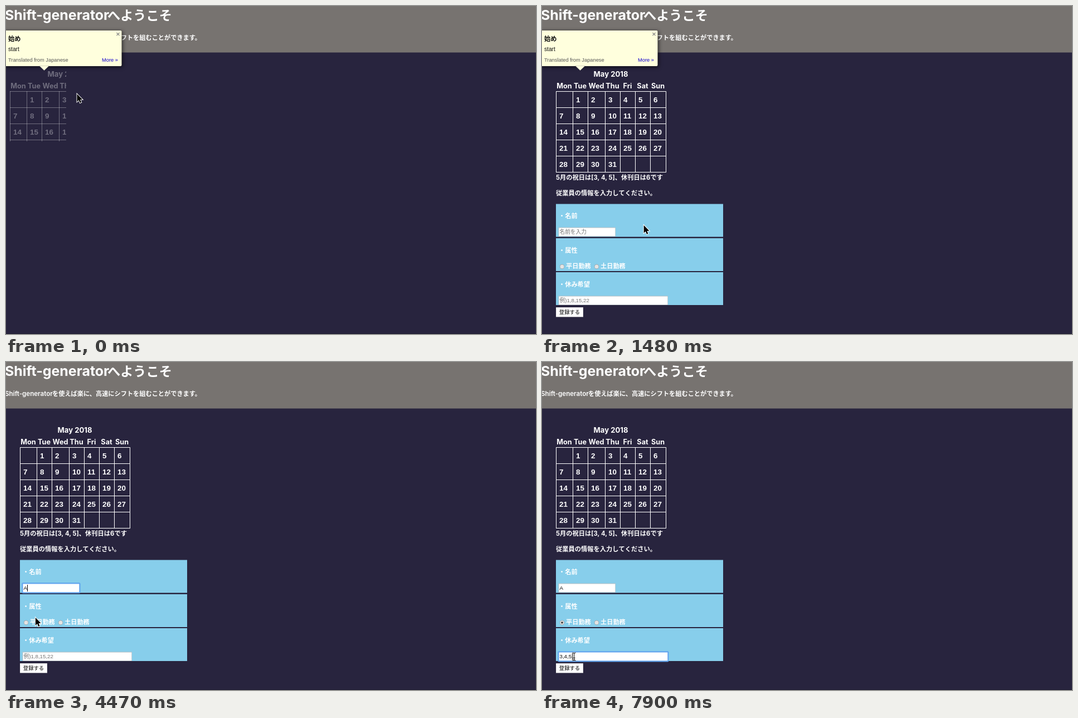
An HTML page with a canvas that plays this animation: 951 px wide and 589 px high, repeating every 8000 ms.

```html
<!DOCTYPE html>
<html lang="ja">
<head>
<meta charset="utf-8">
<title>Shift-generator</title>
<style>
html, body { margin: 0; width: 100%; height: 100%; overflow: hidden; background: #28243e; }
canvas { display: block; }
</style>
</head>
<body>
<canvas id="stage" width="951" height="589"></canvas>
<script>
const ctx = document.getElementById('stage').getContext('2d');
const LOOP = 8000;
const SKY = '#87ceeb';
const CJK = '"Noto Sans CJK JP", "Noto Sans CJK", sans-serif';
const HEADING = 'Inter, ' + CJK;
const FIELD = '"Liberation Sans", ' + CJK;

const NAME = { x: 30, y: 398, w: 102, h: 16 };
const DAYS_OFF = { x: 30, y: 521, w: 196, h: 16 };
const COLUMNS = [0, 30, 57, 88, 115, 142, 169, 197];
const ROWS = [153, 182, 211, 240, 269, 298];

// Pointer path: time, x, y
const PATH = [
  [0, 127, 157.5], [590, 183, 204], [1030, 234, 355], [1180, 235, 409],
  [1480, 183, 393], [1930, 114, 411], [3870, 114, 411], [4620, 35, 472],
  [4910, 35, 472], [5060, 40, 481], [5210, 52, 512], [5340, 57.5, 529]
];

function rect(x, y, w, h, color) {
  ctx.fillStyle = color;
  ctx.fillRect(x, y, w, h);
}

function text(str, x, y, font, color = '#fff', align = 'left') {
  ctx.font = font;
  ctx.fillStyle = color;
  ctx.textAlign = align;
  ctx.fillText(str, x, y);
}

function polygon(points, fill, stroke, width) {
  ctx.beginPath();
  points.forEach(([x, y]) => ctx.lineTo(x, y));
  ctx.closePath();
  ctx.strokeStyle = stroke;
  ctx.lineWidth = width;
  ctx.stroke();
  ctx.fillStyle = fill;
  ctx.fill();
}

function within(t, from, to) {
  return t >= from && t < to;
}

function header() {
  rect(0, 0, 951, 83.5, '#777370');
  text('Shift-generator', -2, 25, '700 24.9px ' + HEADING);
  text('へようこそ', 182, 25, '700 23.2px ' + CJK);
  text('Shift-generator', -2, 61, '600 11.6px ' + HEADING);
  text('を使えば楽に、高速にシフトを組むことができます。', 83, 61, '600 11.2px ' + CJK);
}

function tooltip() {
  ctx.save();
  ctx.shadowColor = 'rgba(0,0,0,.7)';
  ctx.shadowBlur = 7;
  ctx.shadowOffsetX = ctx.shadowOffsetY = 1.5;
  ctx.fillStyle = '#ffffdd';
  ctx.beginPath();
  ctx.roundRect(-4, 44, 211.5, 64, 2);
  ctx.fill();
  ctx.restore();
  polygon([[60, 107.5], [68.5, 115.5], [77, 107.5]], '#ffffdd', '#999', 0.8);
  text('始め', 4, 63, '700 11.2px ' + CJK, '#111');
  text('start', 4, 80.5, '10.2px ' + FIELD, '#111');
  text('Translated from Japanese', 4, 99.5, '9.3px ' + FIELD, '#555');
  text('More »', 172, 99.5, '9.3px ' + FIELD, '#1100cc');
  ctx.strokeStyle = '#888';
  ctx.lineWidth = 1.2;
  ctx.beginPath();
  ctx.moveTo(198.5, 48); ctx.lineTo(203.5, 53);
  ctx.moveTo(203.5, 48); ctx.lineTo(198.5, 53);
  ctx.stroke();
}

// Coordinates are relative to the left edge of the table.
function calendar() {
  text('May 2018', 98.5, 127, '700 13.1px ' + HEADING, '#fff', 'center');
  ['Mon', 'Tue', 'Wed', 'Thu', 'Fri', 'Sat', 'Sun'].forEach((day, i) => {
    const mid = (COLUMNS[i] + COLUMNS[i + 1]) / 2;
    text(day, mid, 147.5, '700 12.7px ' + HEADING, '#fff', 'center');
  });
  COLUMNS.forEach(x => rect(x, 153, 1, 146, '#fff'));
  ROWS.forEach(y => rect(0, y, 198, 1, '#fff'));
  for (let day = 1; day <= 31; day++) {
    text(day, COLUMNS[day % 7] + 6, ROWS[Math.floor(day / 7)] + 20, '700 13.4px ' + FIELD);
  }
  text('5月の祝日は[3, 4, 5]、休刊日は6です', 0, 312, '700 11.25px ' + HEADING);
  text('従業員の情報を入力してください。', 0, 340, '700 11.25px ' + CJK);
}

function input(box, value, hint, focused, caret) {
  const { x, y, w, h } = box;
  if (focused) {
    ctx.fillStyle = '#62a5ee';
    ctx.beginPath();
    ctx.roundRect(x - 1.7, y - 1.7, w + 3.2, h + 3.2, 2);
    ctx.fill();
  } else {
    rect(x - 0.5, y - 0.5, w + 0.5, h + 0.5, '#b5bfc4');
  }
  rect(x + 0.5, y + 0.5, w - 1.2, h - 1.2, '#fff');
  const font = '9.7px ' + FIELD;
  text(value || hint, 31.5, y + 11.3, font, value ? '#111' : '#757575');
  if (caret) rect(Math.round(32 + ctx.measureText(value).width), y + 2, 1, 12, '#000');
}

function radio(x, label, checked) {
  const dot = (r, color) => {
    ctx.fillStyle = color;
    ctx.beginPath();
    ctx.arc(x, 468, r, 0, Math.PI * 2);
    ctx.fill();
  };
  dot(4.2, '#929ca1');
  dot(3.5, '#e4e4e4');
  if (checked) dot(1.8, '#333');
  text(label, x + 7, 471, '600 11.2px ' + CJK);
}

function form(t, right) {
  [[355.5, '名前'], [417, '属性'], [478, '休み希望']].forEach(([y, label]) => {
    rect(25, y, right - 25, 59, SKY);
    text('・' + label, 30, y + 25.5, '600 11.2px ' + CJK);
  });

  const nameCaret = within(t, 2520, 2970) || within(t, 3420, 3870) || within(t, 4320, 4760);
  input(NAME, t >= 3420 ? 'A' : '', '名前を入力', within(t, 2520, 4760), nameCaret);

  radio(36, '平日勤務', t >= 4760);
  radio(98, '土日勤務', false);

  const typed = [7160, 7460, 7610, 7760, 7900].filter(at => t >= at).length;
  const daysCaret = within(t, 5660, 6110) || t >= 6710;
  input(DAYS_OFF, '3,4,5'.slice(0, typed), '例)1,8,15,22', t >= 5660, daysCaret);

  rect(25, 541, 49, 17.5, '#c8c8c8');
  rect(25.5, 541.5, 48, 16.5, '#fff');
  text('登録する', 49.5, 552.5, '9.33px ' + CJK, '#000', 'center');

  if (within(t, 7160, 7900)) {
    rect(29, 539, 197, 22, '#b4b4b4');
    rect(30, 540, 195, 20, '#fff');
    text('3,4,5', 33, 553.5, '9.7px ' + FIELD, '#111');
  }
}

// The panel grows, slides right and fades in together.
function panel(t, moved) {
  const phase = Math.min(1, 0.391 + 0.000407 * moved);
  const grown = 0.5 - 0.5 * Math.cos(Math.PI * phase);
  const left = Math.floor(25.2 - 27 * (1 - grown));
  const right = Math.round(325 * grown);
  ctx.save();
  ctx.beginPath();
  ctx.rect(0, 84, right, 2 + 473 * grown);
  ctx.clip();
  ctx.globalAlpha = grown;
  ctx.translate(left, 0);
  calendar();
  if (t < 1330) {
    rect(0, 355.7, right - left, 9, SKY);
  } else {
    ctx.translate(-25, 0);
    form(t, right + 25 - left);
  }
  ctx.restore();
}

function pointerAt(t) {
  const next = PATH.findIndex(p => p[0] > t);
  if (next < 0) return PATH[PATH.length - 1].slice(1);
  const [t0, x0, y0] = PATH[next - 1];
  const [t1, x1, y1] = PATH[next];
  const k = (t - t0) / (t1 - t0);
  return [x0 + (x1 - x0) * k, y0 + (y1 - y0) * k];
}

function ibeam() {
  const stroke = (color, width) => {
    ctx.strokeStyle = color;
    ctx.lineWidth = width;
    ctx.beginPath();
    ctx.moveTo(-3, -7); ctx.quadraticCurveTo(0, -7, 0, -5);
    ctx.lineTo(0, 5); ctx.quadraticCurveTo(0, 7, -3, 7);
    ctx.moveTo(3, -7); ctx.quadraticCurveTo(0, -7, 0, -5);
    ctx.moveTo(0, 5); ctx.quadraticCurveTo(0, 7, 3, 7);
    ctx.moveTo(-2, 2.5); ctx.lineTo(2, 2.5);
    ctx.stroke();
  };
  stroke('rgba(255,255,255,.7)', 2.2);
  stroke('#111', 1.1);
}

function pointer(t) {
  const [x, y] = pointerAt(t);
  const over = b => x >= b.x && x <= b.x + b.w && y >= b.y && y <= b.y + b.h;
  ctx.save();
  ctx.translate(x, y);
  if (t >= 1330 && (over(NAME) || over(DAYS_OFF))) {
    ibeam();
  } else {
    polygon([[0.5, 0.5], [0.5, 14.4], [3.7, 11.5], [5.8, 16.5], [8.1, 15.5], [6.1, 10.7], [10.2, 10.5]],
      '#000', '#fff', 1.9);
  }
  ctx.restore();
}

function draw(now) {
  const t = now % LOOP;
  // Movement is seen in steps, as in a screen recording.
  const moved = Math.floor((t + 16) / 149.1) * 148.5;
  rect(0, 0, 951, 589, '#28243e');
  rect(0, 588, 951, 1, '#1f1c31');
  header();
  panel(t, moved);
  if (t < 2520) tooltip();
  pointer(moved);
  requestAnimationFrame(draw);
}

requestAnimationFrame(draw);
</script>
</body>
</html>
```
